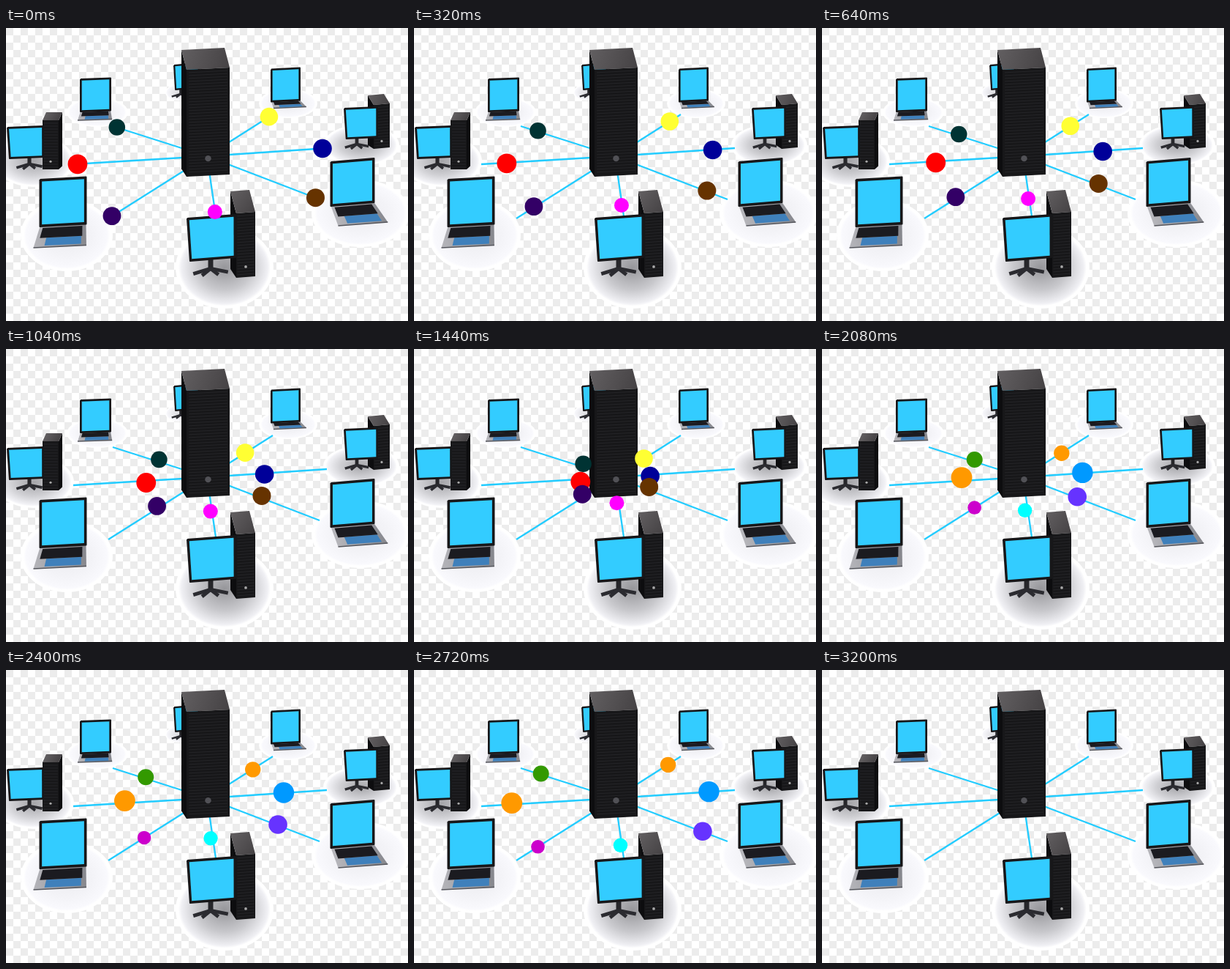
Recreate the animation shown at these times as an HTML page with a canvas. Size 550 px wide and 400 px high, loop 8 s.

```html
<!DOCTYPE html>
<html lang="en">
<head>
<meta charset="utf-8">
<title>Server network</title>
<style>
html, body { margin: 0; width: 100%; height: 100%; overflow: hidden; background: #fff; }
canvas { display: block; }
</style>
</head>
<body>
<canvas id="stage" width="550" height="400"></canvas>
<script>
const stage = document.getElementById('stage');
const view = stage.getContext('2d');
const scene = document.createElement('canvas');
scene.width = stage.width;
scene.height = stage.height;
const c = scene.getContext('2d');

const LOOP = 8000, STEP = 80, TRIP = 20;
const SCREEN = '#33ccff', BLACK = '#171719', SIDE = '#0d0d0f';
const HUB = [275, 175];
const MARGIN = 6; // gap between a ball's outer stop and the end of its cable

// Each cable ends at `end`; balls go in to one stop and out from another
const links = [
  { end: [146, 134], in: ball('#003333', 11.3, 236, 158), out: ball('#339900', 11, 235, 158) },
  { end: [92, 186], in: ball('#ff0000', 13.4, 235, 181), out: ball('#ff9900', 14.4, 234, 171) },
  { end: [140, 260], in: ball('#330066', 12.4, 235, 195), out: ball('#cc00cc', 9.3, 238, 198) },
  { end: [287, 257], in: ball('#ff00ff', 10, 277, 208), out: ball('#00ffff', 9.7, 274, 206) },
  { end: [365, 118], in: ball('#ffff33', 12.3, 312, 151), out: ball('#ff9900', 10.7, 313, 152) },
  { end: [439, 164], in: ball('#000099', 12.8, 317, 174), out: ball('#0099ff', 14.2, 321, 171) },
  { end: [429, 234], in: ball('#663300', 12.5, 316, 186), out: ball('#6633ff', 12.8, 315, 188) }
];

function ball(color, r, x, y) {
  return { color, r, stop: [x, y] };
}

function mix(a, b, k) {
  return [a[0] + (b[0] - a[0]) * k, a[1] + (b[1] - a[1]) * k];
}

// Point inside a quad given clockwise from its top left corner
function on(q, u, v) {
  return mix(mix(q[0], q[1], u), mix(q[3], q[2], u), v);
}

function part(q, u0, v0, u1, v1) {
  return [on(q, u0, v0), on(q, u1, v0), on(q, u1, v1), on(q, u0, v1)];
}

function slanted(x, y, w, h, rise) {
  return [[x, y], [x + w, y - rise], [x + w, y + h - rise], [x, y + h]];
}

function trace(points) {
  c.beginPath();
  for (const p of points) c.lineTo(...p);
}

function poly(points, fill) {
  trace(points);
  c.closePath();
  c.fillStyle = fill;
  c.fill();
}

function line(points, color, width) {
  trace(points);
  c.strokeStyle = color;
  c.lineWidth = width;
  c.stroke();
}

function disc(ctx, color, x, y, r) {
  ctx.beginPath();
  ctx.arc(x, y, r, 0, Math.PI * 2);
  ctx.fillStyle = color;
  ctx.fill();
}

function ramp(a, b, from, to) {
  const g = c.createLinearGradient(...a, ...b);
  g.addColorStop(0, from);
  g.addColorStop(1, to);
  return g;
}

// Round white floor; shade is the grey level in the middle
function floor(x, y, rx, ry, shade) {
  const grey = k => {
    const v = Math.round(shade + (250 - shade) * k);
    return `rgb(${v},${v},${v + 4})`;
  };
  c.save();
  c.translate(x, y);
  c.scale(rx, ry);
  const g = c.createRadialGradient(0, 0, 0, 0, 0, 1);
  g.addColorStop(0, grey(0));
  g.addColorStop(0.55, grey(0.5));
  g.addColorStop(0.88, grey(0.9));
  g.addColorStop(0.94, '#fff');
  disc(c, g, 0, 0, 1);
  c.restore();
}

function panel(q, rim) {
  const w = q[1][0] - q[0][0], h = q[3][1] - q[0][1];
  c.lineJoin = 'round';
  poly(q, BLACK);
  line([...q, q[0]], BLACK, 2);
  poly(part(q, rim / w, rim / h, 1 - rim / w, 1 - rim / h), SCREEN);
}

function laptop(x, y, w, h, rise, lean, depth) {
  const lid = slanted(x, y, w, h, rise);
  const [, , right, left] = lid;
  const base = [left, right,
    [right[0] + lean + w * 0.15, right[1] + depth], [left[0] + lean, left[1] + depth]];
  poly(base, ramp(base[3], base[2], '#b5b5ba', '#86878d'));
  line([base[3], base[2]], '#55565c', 1.5);
  poly(part(base, 0.2, 0.55, 0.9, 0.92), '#3f80bb');
  poly(part(base, 0.07, 0.08, 0.92, 0.55), '#1b1b20');
  panel(lid, w / 24);
}

// Front face at x, y; the back edge of the top is offset by dx, dy
function tower(x, y, w, h, rise, dx, dy) {
  const front = slanted(x, y, w, h, rise);
  const [a, b, , d] = front;
  const back = (p, k = 1) => [p[0] + dx, p[1] + dy * k];
  const near = dx < 0 ? a : b, foot = dx < 0 ? d : front[2];
  poly([near, back(near), back(foot, 0.4), foot], SIDE);
  poly([back(a), back(b), b, a], ramp(back(a), b, '#625f61', '#454244'));
  poly(front, BLACK);
  for (let v = 4; v < h - 2; v += 4) {
    line([on(front, 0.05, v / h), on(front, 0.95, v / h)], '#252528', 1);
  }
  const r = w / 14;
  disc(c, w > 40 ? '#515156' : '#aaa', ...on(front, 0.5, 0.84), r);
}

function monitor(x, y, w, h, rise, neckX) {
  const q = slanted(x, y, w, h, rise);
  q[3][0] += w * 0.06;
  const neckY = y + h * 1.18, reach = w * 0.36, thick = w * 0.075;
  line([[neckX, y + h * 0.9], [neckX, neckY]], '#26262a', thick * 1.4);
  for (const [u, v] of [[-1, 0.3], [1, 0.2], [-0.5, 0.4], [0.45, 0.35]]) {
    line([[neckX, neckY], [neckX + u * reach, neckY + v * reach]], '#2b2b30', thick);
  }
  panel(q, w / 26);
}

function checks(size) {
  c.fillStyle = '#fff';
  c.fillRect(0, 0, scene.width, scene.height);
  c.fillStyle = '#ececec';
  for (let y = 0; y * size < scene.height; y++) {
    for (let x = y % 2; x * size < scene.width; x += 2) {
      c.fillRect(x * size, y * size, size, size);
    }
  }
}

function drawScene() {
  checks(10);
  floor(236, 88, 18, 11, 220);
  floor(125, 115, 42, 20, 236);
  floor(386, 103, 40, 20, 236);
  floor(38, 182, 55, 35, 165);
  floor(486, 160, 52, 28, 165);
  floor(83, 283, 63, 49, 236);
  floor(485, 253, 67, 46, 236);
  floor(299, 327, 67, 56, 150);

  for (const { end } of links) line([end, HUB], '#22ccff', 2.3);

  monitor(230, 51, 34, 33, 3, 239);
  tower(247, 57, 59, 146, 3, -7, -27);

  laptop(102, 70, 41, 44, 1.5, -4, 12);
  laptop(363, 56.5, 39, 44, 2, 3, 9);

  tower(50, 126, 22, 67, 0, 5, -11);
  monitor(2, 136, 49, 42, 2, 32);
  tower(503, 105, 22, 60, 2, -8, -13);
  monitor(463, 110, 45, 41, 2, 480);

  laptop(46.5, 207, 63, 64, 3.5, -9, 29);
  laptop(444.5, 183, 59, 60, 5, 10, 27);

  tower(315, 253, 26, 88, 2, -8, -30);
  monitor(248, 260, 66, 58, 5, 280);
}

function draw(now) {
  const tick = Math.floor((now % LOOP) / STEP);
  view.drawImage(scene, 0, 0);
  if (tick >= 2 * TRIP) return;
  const inward = tick < TRIP;
  const k = (tick % TRIP) / (TRIP - 1);
  for (const link of links) {
    const { color, r, stop } = inward ? link.in : link.out;
    const span = Math.hypot(link.end[0] - stop[0], link.end[1] - stop[1]);
    const outer = mix(link.end, stop, MARGIN / span);
    disc(view, color, ...mix(outer, stop, inward ? k : 1 - k), r);
  }
}

drawScene();
draw(0);
let start;
requestAnimationFrame(function frame(now) {
  start ??= now;
  draw(now - start);
  requestAnimationFrame(frame);
});
</script>
</body>
</html>
```
